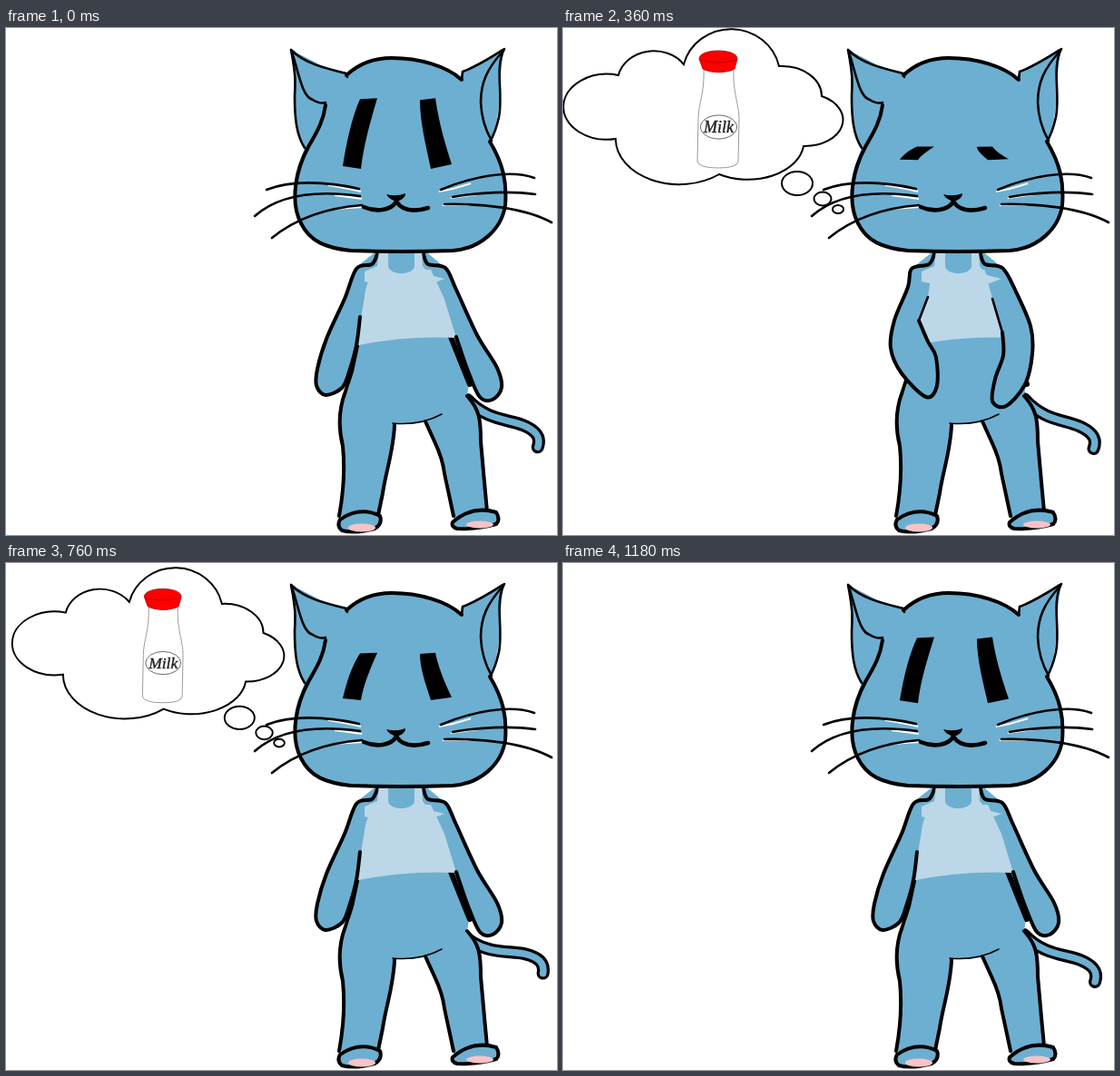
An HTML page that plays this animation: 607x558 px, repeating every 1.2 s.

```html
<!DOCTYPE html>
<html lang="en">
<head>
<meta charset="utf-8">
<title>Cat dreaming of milk</title>
<style>
  html, body { margin: 0; width: 100%; height: 100%; overflow: hidden; background: #fff; }
  svg { display: block; width: 100vw; height: 100vh; }
  .skin { fill: #6dafd1; }
  .ink { fill: none; stroke: #000; stroke-width: 4; stroke-linecap: round; stroke-linejoin: round; }
  .thin { stroke-width: 2.6; }
  .foot { fill: #6dafd1; }
  .shirt { fill: #bcd7e8; }
  .bubble { fill: #fff; stroke: #000; stroke-width: 2; }
  .glass { fill: #fff; stroke: #999; stroke-width: 1; }
  .toe { fill: #f7c3c6; }
  .glint { fill: none; stroke: #fff; stroke-width: 2; }
  text { font: italic 18px "Liberation Serif", serif; fill: #222; stroke: #222; stroke-width: .4; text-anchor: middle; }
</style>
</head>
<body>
<svg viewBox="0 0 607 558">
  <g id="cloud">
    <path class="bubble" d="M58 122A48 36 0 1 1 61 52A40 34 0 0 1 133 40A54 52 0 0 1 238 42A44 33 0 0 1 285 75A42 29 0 0 1 265 130A62 42 0 0 1 172 161A70 50 0 0 1 58 122Z"/>
    <ellipse class="bubble" cx="258" cy="171" rx="17" ry="13"/>
    <ellipse class="bubble" cx="286" cy="188" rx="9.5" ry="7.5"/>
    <ellipse class="bubble" cx="303" cy="199.5" rx="6" ry="4.5"/>
    <path class="glass" d="M155 46C156 72 149 84 149 100L148 147Q150 154 171 154Q192 154 193 147L194 100C194 84 187 72 188 46Z"/>
    <path d="M150 34C150 22 192 22 192 34L189 45C180 50 163 50 154 45Z" fill="#f00" stroke="#a00" stroke-width=".8"/>
    <path d="M151 35Q171 41 191 35" fill="none" stroke="#a00" stroke-width=".8"/>
    <ellipse class="glass" cx="171.5" cy="109" rx="20" ry="13" style="stroke:#666"/>
    <text x="171.5" y="115">Milk</text>
  </g>

  <g id="tail" fill="none" stroke-linecap="round">
    <path d="M508 409C530 432 552 430 570 437C587 444 589 452 586 461" stroke="#000" stroke-width="14"/>
    <path d="M508 409C530 432 552 430 570 437C587 444 589 452 586 461" stroke="#6dafd1" stroke-width="7.5"/>
  </g>

  <path class="skin" d="M410 244H460L484 264L490 300L503 355L510 392L508 405C522 420 523 430 523 455L527 500L531 536L493 540C489 505 486 490 481 476L462 432C450 436 440 436 428 436C427 465 418 490 415 512L412 537L367 537C372 510 373 480 371 460C366 440 368 420 378 395L387 350L380 310L385 264Z"/>
  <g class="ink">
    <path d="M387 350L381 378L374 400C367 418 366 440 371 460C373 480 372 510 367 537"/>
    <path d="M428 437C427 465 418 490 415 512L410 536"/>
    <path d="M462 433L472 455Q481 474 483 490L493 537"/>
    <path d="M490 340L502 370L511 392" stroke-width="6"/>
    <path d="M508 405C522 420 523 432 523 455L527 500L530 532"/>
    <path d="M426 435Q456 438 480 425" stroke-width="1.6"/>
  </g>
  <path class="ink" style="fill:#6dafd1" d="M368 541Q390 526 412 537Q415 546 406 551Q384 557 370 553Q364 548 368 541Z"/>
  <ellipse class="toe" cx="392" cy="550" rx="15" ry="4.5"/>
  <path class="ink" style="fill:#6dafd1" d="M492 544Q513 525 540 533Q545 541 540 546Q518 552 497 551Q490 549 492 544Z"/>
  <ellipse class="toe" cx="522" cy="546.5" rx="15" ry="4"/>

  <path class="shirt" d="M397 266H480V286L484 300L498 341Q440 338 386 349.5L395 295Z"/>
  <path class="skin" d="M421 244H450V262C449 273 422 273 421 262Z"/>
  <g id="arms"></g>
  <path class="shirt" d="M411 244H421V262C422 273 449 273 450 262V244H458L459 262L467 272L483 276L470 281H404L395 279L395 268L409 262Z"/>

  <path class="skin" d="M376 51C392 36 410 33 425 33C455 33 486 42 502 57L503 48L549 23C541 60 548 95 533 125C548 150 552 170 550 195C546 222 520 245 490 246H400C365 246 342 241 332 225C317 205 312 180 322 150L329 132C318 112 316 90 318 60L314 24L345 40Z"/>
  <g class="ink">
    <path d="M375 52C392 36 410 33 425 33C455 33 486 42 502 57"/>
    <path d="M352 85C349 106 340 118 333 131C320 155 312 190 325 215C335 235 352 242 380 245Q435 247 492 245C522 243 546 222 550 195C552 170 548 150 533 125"/>
    <path class="thin" d="M376 54L375 50C355 45 330 40 314 24C319 50 319 58 318 75C318 100 320 118 329 132"/>
    <path class="thin" d="M315 27C323 50 326 76 338 79Q346 84 352 82"/>
    <path class="thin" d="M502 57L503 48C520 42 535 32 549 23C538 44 548 72 543 98Q539 116 533 125"/>
    <path class="thin" d="M547 26C530 45 523 60 523 82Q524 105 535 124"/>
  </g>
  <path class="glint" d="M355 173Q375 176 391 180M362 184L392 188M362 199L392 197M477 180Q495 177 512 171M490 187L520 183M481 195L512 195"/>
  <g class="ink thin">
    <path d="M287 178C312 168 350 168 389 177"/>
    <path d="M274 207C300 184 340 178 390 185"/>
    <path d="M293 231C320 209 352 198 392 195"/>
    <path d="M479 178C512 164 555 155 582 165"/>
    <path d="M492 186C520 181 555 179 583 183"/>
    <path d="M483 194C525 193 572 198 601 214"/>
  </g>
  <path class="ink" style="stroke-width:4.6" d="M394 197C408 203 424 201 430 191C438 203 452 202 465 198"/>
  <path d="M419 183Q430 186 440 182Q440 188 431 191Q422 189 419 183Z"/>
  <g id="eyes">
    <path d="M390 78L409 77C402 101 394 128 391 155L371 152C375 126 381 98 390 78Z"/>
    <path d="M456 79L473 77C477 105 484 128 491 150L468 155C463 131 456 104 456 79Z"/>
  </g>
</svg>
<script>
const LOOP = 1200;
const $ = id => document.getElementById(id);
const mix = (a, b, u) => a + (b - a) * u;
const clamp = u => Math.min(1, Math.max(0, u));

// Linear interpolation over [time, value] keys.
function keyed(keys, t) {
  const i = keys.findIndex(k => k[0] > t);
  if (i < 0) return keys[keys.length - 1][1];
  const [t0, a] = keys[i - 1], [t1, b] = keys[i];
  return mix(a, b, (t - t0) / (t1 - t0));
}

// Smooth path through points.
function curve(pts) {
  let d = 'M' + pts[0];
  for (let i = 0; i < pts.length - 1; i++) {
    const p0 = pts[i - 1] || pts[i], p1 = pts[i], p2 = pts[i + 1], p3 = pts[i + 2] || p2;
    const c1 = p1.map((v, k) => v + (p2[k] - p0[k]) / 6);
    const c2 = p2.map((v, k) => v - (p3[k] - p1[k]) / 6);
    d += `C${c1} ${c2} ${p2}`;
  }
  return d;
}

const points = s => s.split(' ').map(p => p.split(',').map(Number));

function addPath(cls) {
  const p = document.createElementNS('http://www.w3.org/2000/svg', 'path');
  p.setAttribute('class', cls);
  return $('arms').appendChild(p);
}

// Each arm bends between a hanging and a folded pose.
const arms = [
  ['409,249 403,260 386,265 373,298 353,342 343,375 342,394 352,404 370,396 378,378 386,349 390,318 396,288',
   '409,249 403,260 384,265 380,285 365,322 361,352 373,380 400,406 412,394 411,362 402,345 392,322 402,296'],
  ['460,249 465,260 484,264 496,288 519,338 541,374 546,396 536,409 522,406 510,380 500,352 496,340 483,298',
   '460,249 465,260 484,264 498,288 515,328 517,358 509,392 488,416 473,411 476,386 485,360 484,335 473,298']
].map(([down, up]) => ({
  down: points(down), up: points(up),
  fill: addPath('skin'), line: addPath('ink'), inner: addPath('ink thin')
}));

function drawArms(u) {
  for (const a of arms) {
    const pts = a.down.map((p, i) => p.map((v, k) => mix(v, a.up[i][k], u)));
    a.fill.setAttribute('d', curve(pts) + 'Z');
    a.line.setAttribute('d', curve(pts.slice(0, -1)));
    a.inner.setAttribute('d', curve(pts.slice(-2)));
    a.inner.setAttribute('stroke-opacity', clamp(u * 5));
  }
}

function drawCloud(t) {
  let scale, dx;
  if (t < 620) {
    const v = 1 - clamp(t / 300);
    scale = 1 - v ** 1.56;
    dx = 252 * v;
  } else {
    const v = clamp((t - 620) / 466);
    scale = 1 - v ** 3;
    dx = 252 * v ** 4;
  }
  const x = 156 + dx, y = 103 + 44 * (1 - scale);
  $('cloud').setAttribute('visibility', scale > 0.01 ? 'visible' : 'hidden');
  $('cloud').setAttribute('transform', `translate(${x} ${y}) scale(${scale}) translate(-156 -103)`);
}

function tailAngle(t) {
  const swing = (t0, t1) => Math.cos(Math.PI * (t - t0) / (t1 - t0));
  if (t < 180) return 34 * Math.sin(Math.PI / 2 * t / 180);
  if (t < 570) return -2 + 36 * swing(180, 570);
  if (t < 1005) return -2 - 36 * swing(570, 1005);
  return 34 * Math.cos(Math.PI / 2 * clamp((t - 1005) / 175));
}

const armKeys = [[0, 0], [360, 1], [720, 0]];
const eyeKeys = [[0, 1], [290, 0.2], [360, 0.19], [640, 0.55], [1020, 0.93]];

function draw() {
  const t = performance.now() % LOOP;
  drawCloud(t);
  drawArms(keyed(armKeys, t));
  $('tail').setAttribute('transform', `rotate(${tailAngle(t)} 528 420)`);
  $('eyes').setAttribute('transform', `translate(0 143) scale(1 ${keyed(eyeKeys, t)}) translate(0 -143)`);
  requestAnimationFrame(draw);
}
draw();
</script>
</body>
</html>
```
